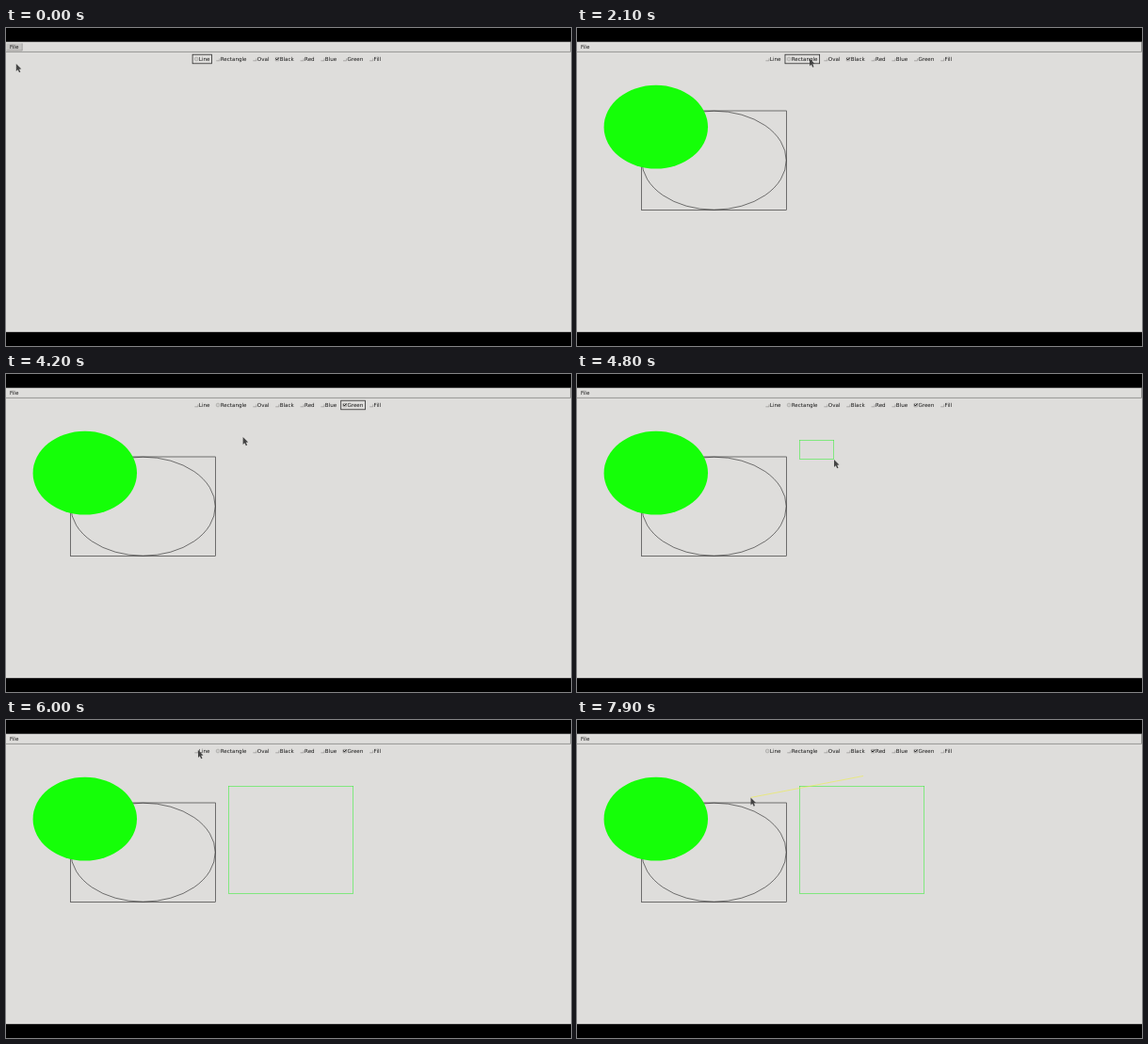
An HTML page for the animation above (8 s loop, 600 by 338 pixels).

```html
<!DOCTYPE html>
<html lang="en">
<head>
<meta charset="utf-8">
<title>Paint window</title>
<style>
  html, body { margin: 0; width: 100%; height: 100%; overflow: hidden; background: #000; }
  svg { display: block; width: 100vw; height: 100vh; }
  text { font: 5.6px "DejaVu Sans", sans-serif; fill: #161616; text-rendering: geometricPrecision; }
  .line { fill: none; stroke-width: .6; }
  .off { fill: none; stroke: #858482; stroke-width: .6; }
  .dot { fill: #d0cfcd; stroke: #a09f9d; stroke-width: .6; }
  .tick { fill: none; stroke: #111; stroke-width: 1; }
  #focus { fill: none; stroke: #222; stroke-width: .75; }
</style>
</head>
<body>
<svg viewBox="0 0 600 338" preserveAspectRatio="none">
  <rect width="600" height="338"/>
  <rect y="14.7" width="600" height="308.5" fill="#dedddb"/>
  <path d="M0 25.4H599.5V15" fill="none" stroke="#858482" stroke-width=".8"/>
  <g id="menu">
    <rect x=".4" y="16.3" width="16.8" height="7.7" fill="#c5c4c2"/>
    <path d="M.4 24H17.2V16.3" class="line" stroke="#8a8987"/>
  </g>
  <text x="4" y="22.3">File</text>
  <g id="bar"></g>
  <rect id="focus" y="28.2" height="9.6"/>
  <g id="art">
    <rect x="68.5" y="88" width="154" height="105.4" class="line" stroke="#222"/>
    <ellipse cx="145.5" cy="140.7" rx="76.7" ry="52.5" class="line" stroke="#222"/>
    <ellipse cx="83.8" cy="105.2" rx="55.2" ry="44.4" fill="#15ff08"/>
  </g>
  <rect id="box" x="236.5" y="70.4" class="line" stroke="#45ee45"/>
  <path id="stroke" class="line" stroke="#eeee45"/>
  <path id="cursor" d="M0 0V8L1.8 6.3 3.2 9.3 4.5 8.7 3.2 5.8 5.5 5.6Z" fill="#444"/>
</svg>
<script>
const LOOP = 8000, STEP = 100, GAP = 11.2;
const $ = id => document.getElementById(id);
const show = (el, on) => el.style.display = on ? "" : "none";
const set = (el, attrs) => Object.entries(attrs).forEach(([k, v]) => el.setAttribute(k, v));

const tools = ["Line", "Rectangle", "Oval"];
const labels = [...tools, "Black", "Red", "Blue", "Green", "Fill"];
const frames = {};

// Lay the labels out in a row, each after the measured width of the last.
let left = 204.8;
for (const name of labels) {
  const mark = tools.includes(name)
    ? '<circle class="dot" cx="2" cy="2" r="1.9"/>'
    : '<path class="off" d="M.2 .4H3.6V3.8H.2Z"/><path class="tick" d="M.5 1.4L1.5 3 3.7 .6"/>';
  $("bar").insertAdjacentHTML("beforeend", `<g transform="translate(${left} 31)">
    <text y="4.1">${name}</text>
    <g transform="translate(-4.6)">
      <g id="${name}On">${mark}</g><path id="${name}Off" class="off" d="M.2 3.8H3.8V1.4"/>
    </g></g>`);
  const width = $("bar").lastElementChild.querySelector("text").getComputedTextLength();
  frames[name] = { x: left - 6.7, width: width + 8.8 };
  left += width + GAP;
}

// Pointer moves: start, end, x and y reached
const moves = [
  [0, 0, 10.8, 38],
  [700, 1300, 262, 50], [1300, 1500, 226, 32],
  [2000, 2100, 247, 32.5], [2100, 2800, 361, 32],
  [3400, 3500, 354, 38], [3500, 4300, 237, 71],
  [4400, 4800, 273, 91], [4800, 5300, 369, 184.8],
  [5400, 6000, 204, 32],
  [6200, 6700, 372, 32.5], [6700, 7100, 318, 32],
  [7300, 7700, 304, 59.5], [7800, 7900, 184.5, 82.4]
];

// Which label has the focus frame, from when
const focus = [[0, "Line"], [1700, "Rectangle"], [3000, "Green"], [4400, ""],
               [6100, "Line"], [7200, "Red"], [7700, ""]];

function tipAt(t) {
  let x = 0, y = 0;
  for (const [start, end, toX, toY] of moves) {
    if (t < start) break;
    const p = t >= end ? 1 : (t - start) / (end - start);
    x += (toX - x) * p;
    y += (toY - y) * p;
  }
  return [x, y];
}

function draw(t) {
  const [x, y] = tipAt(t);
  set($("cursor"), { transform: `translate(${x} ${y})` });
  show($("menu"), t < 500);
  show($("art"), t >= 500);

  const tool = t >= 1700 && t < 6100 ? "Rectangle" : "Line";
  const checked = { [tool]: true, Black: t < 3000, Red: t >= 7200, Green: t >= 3000 };
  for (const name of labels) {
    show($(name + "On"), checked[name]);
    show($(name + "Off"), !checked[name]);
  }

  const frame = frames[focus.filter(f => f[0] <= t).pop()[1]];
  show($("focus"), frame);
  if (frame) set($("focus"), frame);

  const [right, bottom] = tipAt(Math.min(t, 5300));
  show($("box"), t >= 4400);
  set($("box"), { width: Math.max(0, right - 236.8), height: Math.max(0, bottom - 70.8) });

  show($("stroke"), t >= 7900);
  set($("stroke"), { d: `M304 59.5L${x} ${y}` });
}

const start = performance.now();
function tick() {
  const t = (performance.now() - start) % LOOP;
  draw(Math.floor(t / STEP) * STEP);
  requestAnimationFrame(tick);
}
tick();
</script>
</body>
</html>
```
